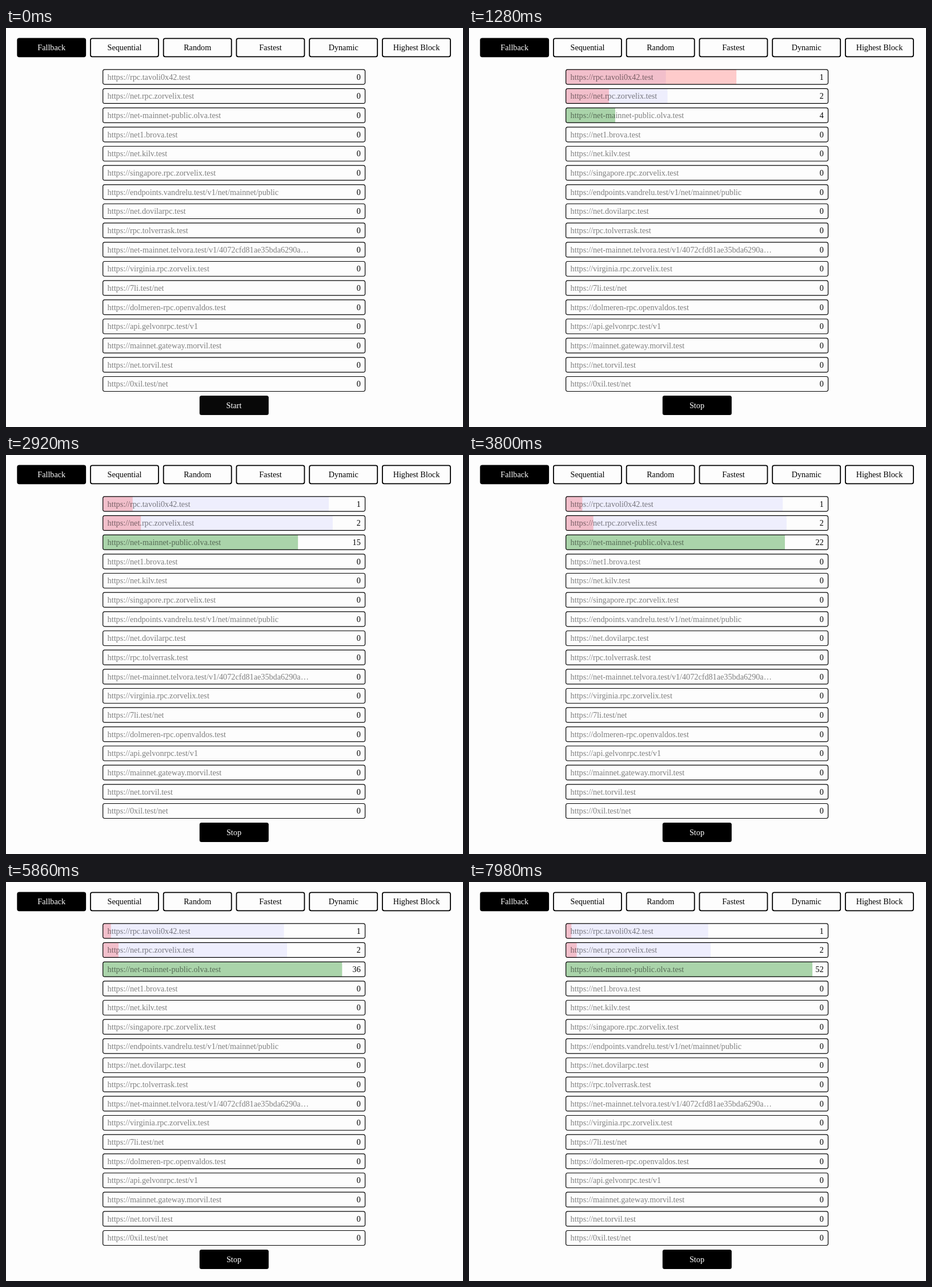
These frames come from a looping animation (800x700 px, 8000 ms). An HTML page:

```html
<!DOCTYPE html>
<html lang="en">
<head>
<meta charset="utf-8">
<title>Request strategies</title>
<style>
  html, body { margin: 0; width: 100%; height: 100%; overflow: hidden; background: #fdfdfd; }
  svg { display: block; }
  text { font: 14.2px "Liberation Serif", "Times New Roman", serif; }
  .frame { fill: none; stroke: #000; }
  .url { fill: rgba(0, 0, 0, .5); }
  .load { fill: rgba(0, 0, 255, .06); }
  .fail { fill: rgba(255, 0, 0, .2); }
  .pass { fill: rgba(0, 128, 0, .33); }
</style>
</head>
<body>
<svg id="stage" width="800" height="700" viewBox="0 0 800 700"></svg>
<script>
const TABS = ["Fallback", "Sequential", "Random", "Fastest", "Dynamic", "Highest Block"];
const HOSTS = [
  "rpc.tavoli0x42.test", "net.rpc.zorvelix.test", "net-mainnet-public.olva.test",
  "net1.brova.test", "net.kilv.test", "singapore.rpc.zorvelix.test",
  "endpoints.vandrelu.test/v1/net/mainnet/public", "net.dovilarpc.test",
  "rpc.tolverrask.test", "net-mainnet.telvora.test/v1/4072cfd81ae35bda6290a…",
  "virginia.rpc.zorvelix.test", "7li.test/net", "dolmeren-rpc.openvaldos.test",
  "api.gelvonrpc.test/v1", "mainnet.gateway.morvil.test", "net.torvil.test", "0xil.test/net"
];
const LOOP = 8000, TICK = 140, BAR_WIDTH = 459;
const stage = document.getElementById("stage");

function add(tag, attrs, content = "") {
  const node = document.createElementNS("http://www.w3.org/2000/svg", tag);
  for (const name in attrs) node.setAttribute(name, attrs[name]);
  node.textContent = content;
  stage.append(node);
  return node;
}

TABS.forEach((label, i) => {
  const x = 20.2 + i * 127.75;
  add("rect", { x, y: 18.3, width: 119, height: 32, rx: 3, class: "frame",
    "stroke-width": 1.8, style: i ? "" : "fill:#000" });
  add("text", { x: x + 59.5, y: 38.8, "text-anchor": "middle", fill: i ? "#000" : "#fff" }, label);
});

const rows = HOSTS.map((host, i) => {
  const y = 72.8 + i * 33.67;
  const bar = kind => add("rect", { x: 170, y, width: 0, height: 26, class: kind });
  const row = i < 3 ? { load: bar("load"), share: bar(i < 2 ? "fail" : "pass") } : {};
  add("rect", { x: 169.6, y, width: 459, height: 26, rx: 3.2, class: "frame", "stroke-width": 1.2 });
  add("text", { x: 177.6, y: y + 17.7, class: "url" }, "https://" + host);
  row.count = add("text", { x: 620.8, y: y + 17.7, "text-anchor": "end" }, "0");
  return row;
});

const button = add("rect", { x: 338.8, y: 645, width: 121, height: 34, rx: 3.5 });
const buttonLabel = add("text", { x: 399, y: 666.5, "text-anchor": "middle", fill: "#fff" });

// Every tick paints three quick steps, then rests.
function heldTime(t) {
  const phase = (t + 20) % TICK;
  return t - phase + Math.min(Math.floor(phase / 20) * 20, 40);
}

function countsAt(t) {
  return [
    t >= 700 ? 1 : 0,
    t >= 840 ? 2 : t >= 820 ? 1 : 0,
    Math.max(0, Math.floor((t - 1400) / TICK) + 5)
  ];
}

// Each bar eases towards its share of all answered requests.
function sharesAt(t) {
  const shares = [t >= 700 ? 1 : 0, 0, 0];
  for (let from = 928; from < t; from += 20) {
    const dt = Math.min(20, t - from);
    const counts = countsAt(from);
    const total = counts[0] + counts[1] + counts[2];
    const pull = 1 - Math.exp(-dt / 622);
    counts.forEach((n, i) => shares[i] += (n / total - shares[i]) * pull);
  }
  return shares;
}

function loadAt(t) {
  const ramp = 1 - Math.exp(-Math.max(0, t - 1002) / 588);
  return ramp * (253 + .0326 * (7980 - t));
}

function draw(time) {
  const t = heldTime(time);
  const counts = countsAt(t), shares = sharesAt(t), load = loadAt(t);
  for (let i = 0; i < 3; i++) {
    rows[i].count.textContent = counts[i];
    rows[i].share.setAttribute("width", shares[i] * BAR_WIDTH);
  }
  rows[0].load.setAttribute("width", load * .983);
  rows[1].load.setAttribute("width", load);
  button.setAttribute("fill", t < 260 ? "#080808" : "#000");
  buttonLabel.textContent = t < 560 ? "Start" : "Stop";
}

const start = performance.now();
function play() {
  draw((performance.now() - start) % LOOP);
  requestAnimationFrame(play);
}
play();
</script>
</body>
</html>
```
